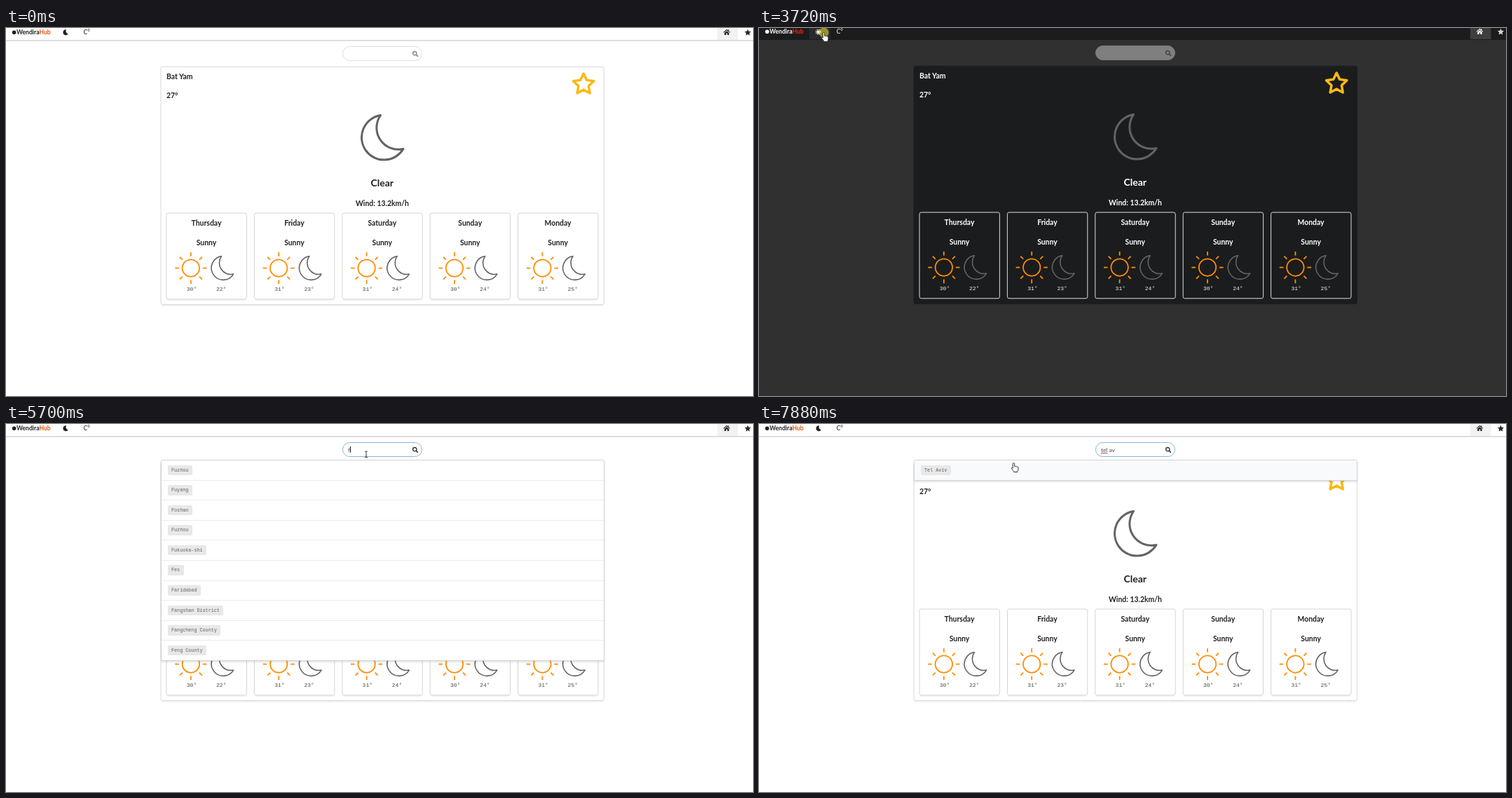
Write an HTML page that moves like this. It is 1066 px wide and 525 px high and loops after 8 s.

```html
<!DOCTYPE html>
<html lang="en">
<head>
<meta charset="utf-8">
<title>Weather dashboard</title>
<style>
html, body { margin: 0; width: 100%; height: 100%; overflow: hidden; }
body {
  position: relative; width: 1066px; height: 525px;
  --page: #fff; --panel: #fff; --ink: #212121; --line: #d8d8d9; --day: #d4d4d5;
  --temp: #4a4a4a; --on: #f2f2f2; --hover: #f7f7f7; --input: #fff; --glass: #858585; --star: #2a2a2a;
  background: var(--page); font: 8.3px Lato, sans-serif; color: var(--ink);
}
body.dark {
  --page: #303030; --panel: #1b1c1d; --ink: #fff; --line: #1b1c1d; --day: #dededf;
  --temp: #f2f2f2; --on: #3d3e3f; --hover: #292a2b; --input: #7f7f7f; --glass: #404040; --star: #d5d5d5;
}
svg { position: absolute; left: 0; top: 0; width: 1066px; height: 525px; }
text { fill: var(--ink); font-family: Lato, sans-serif; font-weight: 700; font-size: 10.4px; }
.mid { text-anchor: middle; }
.temp { font: 8px "Liberation Mono", monospace; fill: var(--temp); }
.ink { fill: var(--ink); }
.panel { fill: var(--panel); stroke: var(--line); }
.day { fill: var(--panel); stroke: var(--day); }
.shade { fill: none; stroke: #d4d4d5; opacity: .6; }
.dark .shade, .dark .moonIcon, body:not(.dark) .sunIcon { display: none; }
.moon { fill: none; stroke: #636363; stroke-width: 3; stroke-linejoin: round; }
.sun { fill: none; stroke: #ff8c00; stroke-width: 1.8; }
.dark #app { transform: translateY(-1px); }
#app { position: absolute; inset: 0; }
#field {
  position: absolute; left: 479.5px; top: 25.5px; width: 114.5px; height: 21.5px; box-sizing: border-box;
  border: 1px solid #dededf; border-radius: 11px; background: var(--input);
  padding-left: 7.5px; line-height: 20.5px; white-space: pre; color: #444;
}
#field.focus { border-color: #85b7d9; --glass: #333; }
.dark #field { border-color: #7f7f7f; }
.typo { text-decoration: underline #e0483a .7px; text-underline-offset: 1px; }
#caret { display: inline-block; width: .8px; height: 9px; background: #222; vertical-align: -1.5px; }
#field svg { left: 97px; top: 4px; width: 12px; height: 12px; }
#list {
  position: absolute; left: 220.5px; top: 51px; width: 633px; box-sizing: border-box; overflow: hidden;
  border: 1px solid #d4d4d5; border-radius: 2.5px; background: #fff;
  box-shadow: 0 1.5px 3px rgba(34,36,38,.15);
}
.row { height: 28.6px; box-sizing: border-box; border-bottom: 1px solid #ececed; padding: 6.5px 0 0 9px; }
.row:last-child { border: 0; height: 28px; }
.row.hover { background: #f9fafb; }
.row span {
  display: inline-block; height: 14.5px; line-height: 14.5px; padding: 0 5.5px; border-radius: 2px;
  background: #e8e8e8; color: #606060; font-family: "Liberation Mono", monospace; font-size: 6.75px;
  vertical-align: top; white-space: pre;
}
</style>
</head>
<body>
<div id="app">
  <svg viewBox="0 0 1066 525">
    <rect class="panel" x="-2" y="-4" width="1070" height="21.5"/>
    <path class="shade" d="M0 18.5H1066"/>
    <rect id="navHover" y="0" height="17" fill="var(--hover)"/>
    <rect x="1015" y="-1" width="29.5" height="18" fill="var(--on)"/>
    <circle class="ink" cx="11.6" cy="6.3" r="2.8"/>
    <text x="15" y="9.4" style="font-size:8.6px">Wendira<tspan id="brand">Hub</tspan></text>
    <path class="ink moonIcon" d="M86 2.2A4 4 0 1 0 88.7 8.5A4.3 4.3 0 0 1 86 2.2Z"/>
    <g class="sunIcon" transform="translate(84.7 6.7)">
      <circle r="2.2" fill="#fff"/>
      <circle r="3.3" fill="none" stroke="#fff" stroke-width="1.3" stroke-dasharray="1.6 1"/>
    </g>
    <text id="unit" x="110.5" y="9.2" style="font-size:8.6px;font-weight:400">C°</text>
    <path class="ink" transform="translate(1028.5 6.2)" d="M0-4.4L1.8-2.8V-4H3V-1.8L4.8-.2 4.1.6 0-2.9-4.1.6-4.8-.2ZM-3.2.7L0-2 3.2.7V3.8H.9V1.3H-.9V3.8H-3.2Z"/>
    <path id="navStar" fill="var(--star)"/>
    <path class="shade" d="M222 396H852"/>
    <rect class="panel" x="221" y="55.3" width="632.3" height="339.3" rx="2.5"/>
    <text x="229" y="73.4">Bat Yam</text>
    <text id="now" x="229" y="100.4"></text>
    <path id="bigStar" fill="none" stroke="#fbb914" stroke-width="3.5" stroke-linejoin="round"/>
    <use href="#moon" x="537" y="156.5"/>
    <text class="mid" x="536.8" y="226" style="font-size:14px">Clear</text>
    <text class="mid" x="537" y="253.7">Wind: 13.2km/h</text>
    <g id="days"></g>
    <defs>
      <path id="moon" class="moon" d="M-2.5-32A32 32 0 1 0 30 16A31 31 0 0 1-2.5-32Z"/>
    </defs>
  </svg>
  <div id="field"><span id="typed"></span><span id="caret"></span>
    <svg viewBox="-6 -6 12 12">
      <g id="glass" fill="none" stroke="var(--glass)" stroke-width="1.4">
        <circle cx="-.7" cy="-.8" r="2.7"/><path d="M1.3 1.2L3.8 3.7" stroke-width="1.7"/>
      </g>
      <g id="spin" fill="none">
        <circle r="4.4" stroke="#e3e3e3"/>
        <path d="M2.8-3.4A4.4 4.4 0 0 1 2.8 3.4" stroke="#767676"/>
      </g>
    </svg>
  </div>
  <div id="list"></div>
</div>
<svg viewBox="0 0 1066 525">
  <g id="tip">
    <rect x="97.5" y="14.5" width="60" height="14" fill="#fff" stroke="#8a8a8a" stroke-width=".8"/>
    <text x="127.5" y="24.4" class="mid" style="font:8px 'Liberation Sans',sans-serif;fill:#555">Dark mode</text>
  </g>
  <g id="cursor">
    <circle id="glow" r="7" fill="#f5e92a" opacity=".55"/>
    <path id="shape" stroke-width=".9" stroke-linejoin="round"/>
  </g>
</svg>
<script>
const $ = id => document.getElementById(id);
const LOOP = 8000;

const starPath = (cx, cy, r, inner) => 'M' + Array.from({ length: 10 }, (_, i) => {
  const a = i * Math.PI / 5, d = i % 2 ? inner : r;
  return (cx + d * Math.sin(a)).toFixed(2) + ' ' + (cy - d * Math.cos(a)).toFixed(2);
}).join('L') + 'Z';
$('navStar').setAttribute('d', starPath(1058.5, 6.6, 4.8, 2.3));
$('bigStar').setAttribute('d', starPath(824.2, 80.5, 15.4, 7.6));

const days = [['Thursday', 30, 22], ['Friday', 31, 23], ['Saturday', 31, 24], ['Sunday', 30, 24], ['Monday', 31, 25]];
const rays = Array.from({ length: 8 }, (_, i) => `<path d="M17 0H22.6" transform="rotate(${i * 45})"/>`).join('');
$('days').innerHTML = days.map(([name], i) => `<g transform="translate(${286 + i * 125.4} 0)">
  <path class="shade" d="M-56 388H56"/>
  <rect class="day" x="-57" y="264" width="114.4" height="122.8" rx="2.5"/>
  <text class="mid" y="282">${name}</text><text class="mid" y="309.6">Sunny</text>
  <g class="sun" transform="translate(-22.2 342.6)"><circle r="12.2"/>${rays}</g>
  <use href="#moon" transform="translate(22.7 342.6) scale(.53)"/>
  <text class="temp mid" x="-21" y="375.3"></text><text class="temp mid" x="21.2" y="375.3"></text>
</g>`).join('');
const temps = [...document.querySelectorAll('.temp')];

const lists = {
  f: ['Fuzhou', 'Fuyang', 'Foshan', 'Fuzhou', 'Fukuoka-shi', 'Fes', 'Faridabad', 'Fangshan District', 'Fangcheng County', 'Feng County'],
  tel: ['Tel Aviv', 'Telanaipura', 'Telok Blangah New Town', 'Telford', 'Telavi', 'Telsiai', 'Telégrafo', 'Tela', 'Telaga Asih', 'Telagamurni'],
  aviv: ['Tel Aviv']
};

const shapes = {
  arrow: 'M0 0V12L2.8 9.4 4.6 13.4 6.4 12.6 4.6 8.7H8.4Z',
  hand: 'M-1.3 7.6V1.2A1.2 1.2 0 0 1 1.1 1.2V5Q2.1 4.2 3.1 5.1 4.1 4.6 4.8 5.5 6.2 5.1 6.4 6.5V9.5Q6.4 11 5.4 12V13H.1V12L-3.1 8Q-3.6 6.7-2.4 6.6Z',
  beam: 'M-2-4H-.5L0-3.5 .5-4H2M0-3.5V4M-2 4.5H-.5L0 4 .5 4.5H2'
};

// time, x, y, shape
const moves = [
  [0, -50, -50, 'arrow'], [120, 996, 486, 'arrow'], [190, 820, 372, 'arrow'], [260, 540, 195, 'arrow'],
  [320, 212, 5, 'arrow'], [390, -50, -50, 'arrow'], [590, 34, 31, 'arrow'], [660, 40, 21, 'arrow'],
  [720, 50, 10, 'hand'], [790, 62, 7, 'hand'], [860, 82, 5, 'hand'], [920, 102, 4, 'hand'],
  [990, 114, 3, 'hand'], [1130, 115, 2, 'hand'], [2850, 110, 4, 'hand'], [2920, 99, 6, 'hand'],
  [2990, 92.5, 6.5, 'hand'], [4780, 122, 9, 'arrow'], [4850, 235, 17, 'arrow'], [4920, 390, 30, 'arrow'],
  [4980, 485, 40, 'beam'], [5040, 514, 43, 'beam'], [7550, 502, 45, 'beam'], [7620, 462, 52, 'hand'],
  [7750, 400, 55, 'hand'], [7820, 370, 55.5, 'hand'], [7880, 363.5, 55.5, 'hand']
];
const clicks = [[1390, 1460], [1720, 1780], [2250, 2320], [2590, 2650], [3650, 3850], [4320, 4510], [5180, 5320]];
const typing = [[5180, ''], [5380, 'f'], [5970, ''], [6100, 't'], [6230, 'te'], [6360, 'tel'], [6820, 'tel '], [6890, 'tel a'], [7090, 'tel av']];
const loading = [[5380, 5640], [6100, 6640], [6820, 7220]];
// time, list, opacity
const results = [[0, '', 0], [5580, 'f', .3], [5640, 'f', .75], [5700, 'f', 1], [5970, '', 0], [6640, 'tel', .5], [6700, 'tel', 1], [7220, 'aviv', 1]];

const at = (steps, t) => steps.findLast(s => s[0] <= t);
const within = (spans, t) => spans.some(([a, b]) => t >= a && t < b);
const show = (el, on) => { el.style.display = on ? '' : 'none'; };
let shown;

function drawList(t, y) {
  const [, key, alpha] = at(results, t);
  if (key !== shown) {
    $('list').innerHTML = (lists[key] || []).map(s => `<div class="row"><span>${s}</span></div>`).join('');
    shown = key;
  }
  show($('list'), key);
  $('list').style.opacity = alpha;
  if (key) $('list').firstChild.classList.toggle('hover', t > 7550 && y > 51);
}

function drawField(t) {
  const step = at(typing, t), text = step ? step[1] : '';
  $('field').classList.toggle('focus', !!step);
  $('typed').innerHTML = text.replace(/^tel(?= )/, '<span class="typo">tel</span>');
  show($('caret'), step && (t - step[0]) % 1000 < 500);
  const busy = within(loading, t);
  show($('glass'), !busy);
  show($('spin'), busy);
  $('spin').setAttribute('transform', `rotate(${(t - 6960) * .6})`);
}

function drawCursor(t) {
  const [, x, y, kind] = at(moves, t), beam = kind === 'beam';
  $('cursor').setAttribute('transform', `translate(${x} ${y})`);
  $('shape').setAttribute('d', shapes[kind]);
  $('shape').setAttribute('fill', beam ? 'none' : '#fff');
  $('shape').setAttribute('stroke', '#222');
  show($('glow'), within(clicks, t));
  const nav = y < 17 && (x > 72 && x < 101 ? [72, 29.5] : x >= 101 && x < 129 && kind === 'hand' ? [102, 26.5] : null);
  show($('navHover'), nav);
  if (nav) {
    $('navHover').setAttribute('x', nav[0]);
    $('navHover').setAttribute('width', nav[1]);
  }
  return y;
}

function draw(t) {
  const dark = t >= 3720 && t < 4450;
  const imperial = within([[1460, 1780], [2320, 2650]], t);
  const deg = c => Math.round(imperial ? c * 1.8 + 32 : c) + '°';
  document.body.classList.toggle('dark', dark);
  $('brand').style.fill = t >= 720 && t < 4450 ? '#f5220f' : '#ea5410';
  $('unit').textContent = imperial ? 'F°' : 'C°';
  $('now').textContent = deg(27);
  temps.forEach((el, i) => { el.textContent = deg(days[i >> 1][1 + i % 2]); });
  show($('tip'), t >= 3450 && t < 3650);
  drawField(t);
  drawList(t, drawCursor(t));
}

function tick() {
  draw(performance.now() % LOOP);
  requestAnimationFrame(tick);
}
tick();
</script>
</body>
</html>
```
